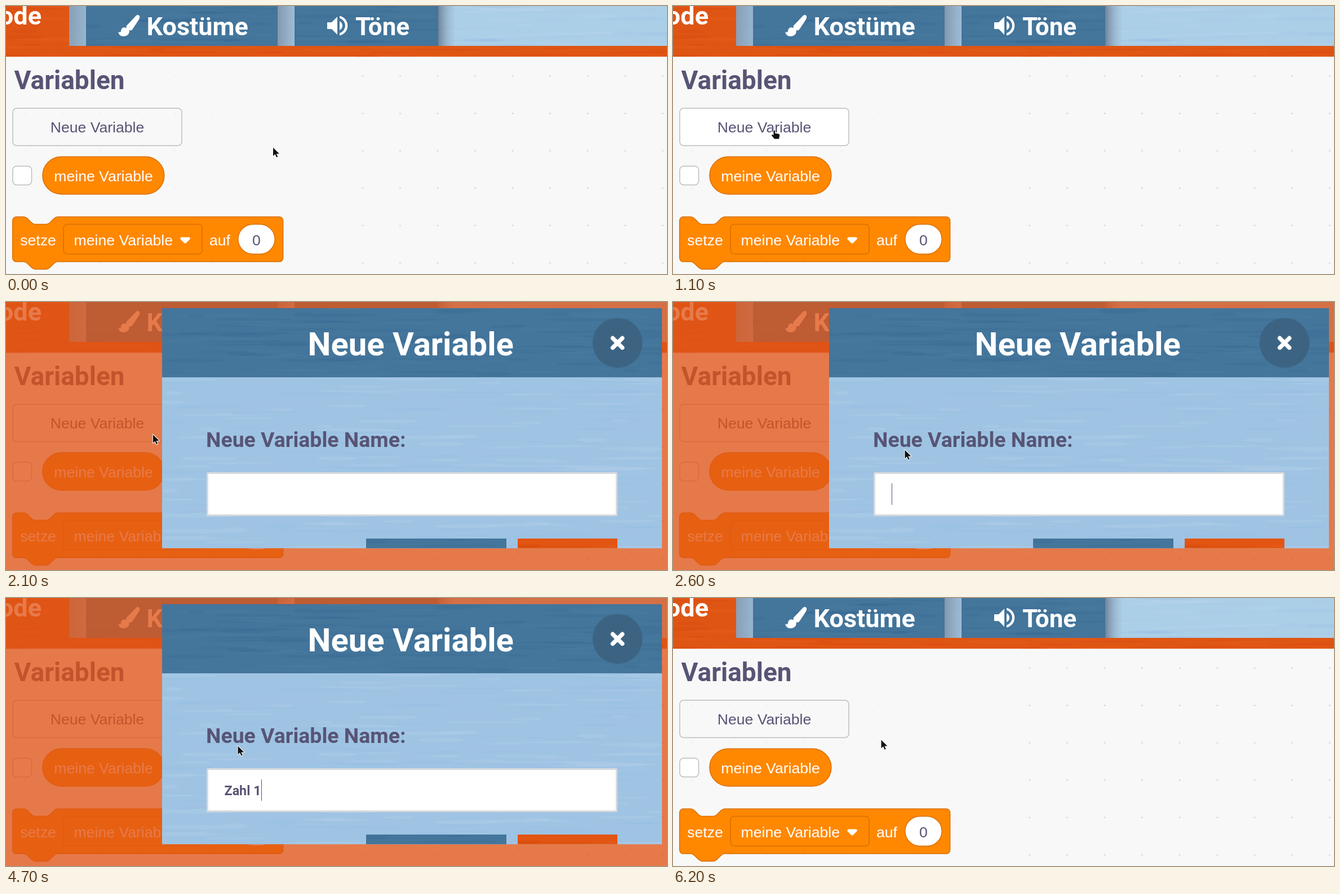
Write an HTML page with a canvas that moves like this. It is 1173 px wide and 477 px high and loops after 7400 ms.

```html
<!DOCTYPE html>
<html lang="de">
<head>
<meta charset="utf-8">
<title>Neue Variable</title>
<style>
html, body { margin: 0; width: 100%; height: 100%; overflow: hidden; background: #f8f8f8; }
canvas { display: block; }
</style>
</head>
<body>
<canvas id="stage" width="1173" height="477"></canvas>
<script>
const W = 1173, H = 477, LOOP = 7400;
const INK = '#575475', BLUE = '#44759b', ORANGE = '#df5514', BLOCK = '#ff8800', EDGE = '#db6e00';
const stage = document.getElementById('stage').getContext('2d');
const head = size => `bold ${size}px Roboto, "Open Sans", sans-serif`;
const LABEL = '26.6px "Liberation Sans", Arial, sans-serif';

function layer(draw) {
  const canvas = document.createElement('canvas');
  canvas.width = W;
  canvas.height = H;
  draw(canvas.getContext('2d'));
  return canvas;
}

function text(c, str, x, y, font, color, align = 'left') {
  c.font = font;
  c.fillStyle = color;
  c.textAlign = align;
  c.fillText(str, x, y);
}

function box(c, x, y, w, h, r, fill, stroke, line = 1.5) {
  c.beginPath();
  c.roundRect(x, y, w, h, r);
  paint(c, fill, stroke, line);
}

function paint(c, fill, stroke, line, path) {
  const args = path ? [path] : [];
  if (fill) { c.fillStyle = fill; c.fill(...args); }
  if (stroke) { c.strokeStyle = stroke; c.lineWidth = line; c.stroke(...args); }
}

function shape(c, d, x, y, scale, fill, stroke, line) {
  c.save();
  c.translate(x, y);
  c.scale(scale, scale);
  paint(c, fill, stroke, line, new Path2D(d));
  c.restore();
}

// Flat area with soft horizontal brush streaks
function brushed(c, x, y, w, h, color, tints, seed) {
  const rnd = () => (seed = seed * 16807 % 2147483647) / 2147483647;
  c.save();
  c.beginPath();
  c.rect(x, y, w, h);
  c.clip();
  c.fillStyle = color;
  c.fillRect(x, y, w, h);
  for (let i = w * h / 900; i > 0; i--) {
    const len = 30 + 150 * rnd();
    c.fillStyle = tints[i % tints.length | 0];
    c.beginPath();
    c.ellipse(x + w * rnd(), y + h * rnd(), len / 2, 1 + 2.5 * rnd(), 0.02 * (rnd() - 0.5), 0, 7);
    c.fill();
  }
  c.restore();
}

const blueTints = ['rgba(35,85,130,.12)', 'rgba(90,140,170,.09)'];
const skyTints = ['rgba(185,215,238,.22)', 'rgba(135,178,220,.16)', 'rgba(165,190,228,.18)'];
const orangeTints = ['rgba(205,65,5,.16)', 'rgba(240,105,35,.16)'];

function shadow(c, x, w, from, to) {
  const g = c.createLinearGradient(x, 0, x + w, 0);
  g.addColorStop(0, from);
  g.addColorStop(1, to);
  c.fillStyle = g;
  c.fillRect(x, 0, w, 71);
}

const BRUSH = 'M36 0Q40 2 37 8L25 26Q22 29 18 26Q13 23 15 19L31 2Q34-1 36 0ZM11 22Q20 24 20 30Q18 38 9 38Q2 38 0 30Q5 32 5 28Q6 22 11 22Z';
const SPEAKER = 'M0 6H4L9 1V17L4 12H0ZM11 5Q13.5 6.3 13.5 9T11 13ZM11 .2A9 9 0 0 1 11 17.8V15.7A7 7 0 0 0 11 2.3Z';
const NOTCH = 'M0 4A4 4 0 0 1 4 0H12c2 0 3 1 4 2l4 4c1 1 2 2 4 2h12c2 0 3-1 4-2l4-4c1-1 2-2 4-2H284.7a4 4 0 0 1 4 4v40a4 4 0 0 1-4 4H48c-2 0-3 1-4 2l-4 4c-1 1-2 2-4 2h-12c-2 0-3-1-4-2l-4-4c-1-1-2-2-4-2H4a4 4 0 0 1-4-4Z';
const ARROW = 'M0 0V15L3.5 11.8L6 17.3L8.3 16.3L5.8 11H11Z';
const HAND = 'M3.5 1Q5-.5 6 1V5.5L12 6.5Q14.5 7 14.2 9.5L13 15.5H5L0 9.5Q0 7.5 2 8L3.5 9Z';

function drawTabs(c) {
  brushed(c, 0, 0, W, 71, '#accfe8', skyTints, 11);
  shadow(c, 112, 30, 'rgba(125,145,168,.75)', 'rgba(145,172,198,.75)');
  shadow(c, 482, 30, 'rgba(125,142,162,.85)', 'rgba(150,178,204,.65)');
  shadow(c, 767, 29, 'rgba(105,125,147,.9)', 'rgba(160,190,215,.25)');
  brushed(c, 142, 0, 340, 71, BLUE, blueTints, 21);
  brushed(c, 512, 0, 255, 71, BLUE, blueTints, 31);
  brushed(c, 0, 0, 112, 72, ORANGE, orangeTints, 41);
  brushed(c, 0, 71, W, 19.5, ORANGE, orangeTints, 51);
  text(c, 'Code', 63, 33, head(45), '#fff', 'right');
  shape(c, BRUSH, 199, 16, 1, '#fff');
  text(c, 'Kostüme', 249.5, 52, head(45), '#fff');
  shape(c, SPEAKER, 570, 17, 2, '#fff');
  text(c, 'Töne', 620, 52, head(44), '#fff');
}

function drawPalette(c) {
  for (let x = 34; x < W; x += 66.55)
    for (let y = 125; y < H; y += 66.45) {
      c.fillStyle = x > 600 ? '#dcdcdc' : '#f1f1f1';
      c.beginPath();
      c.arc(x, y, 1.6, 0, 7);
      c.fill();
    }
  text(c, 'Variablen', 14.5, 148, head(46), INK);
  box(c, 12, 285, 33.5, 33.5, 7, '#fff', '#bdbdbd');
  box(c, 65, 268.3, 215.8, 66.7, 33.3, BLOCK, EDGE);
  text(c, 'meine Variable', 173, 312, LABEL, '#fff', 'center');

  shape(c, NOTCH, 11.7, 375.3, 1.6625, BLOCK, EDGE, 0.9);
  text(c, 'setze', 57, 425.5, LABEL, '#fff', 'center');
  box(c, 102, 388.5, 246, 53, 6.6, BLOCK, EDGE);
  text(c, 'meine Variable', 208.3, 425.5, LABEL, '#fff', 'center');
  shape(c, 'M2 0H16Q19 1 17 4L11 10Q9 12 7 10L1 4Q-1 1 2 0Z', 309, 411.5, 1, '#fff');
  text(c, 'auf', 379.5, 425.5, LABEL, '#fff', 'center');
  box(c, 411.8, 388.5, 65.4, 53, 26.5, '#fff', EDGE);
  text(c, '0', 444.5, 425.5, LABEL, INK, 'center');
}

function drawButton(c, hover) {
  box(c, 12, 182, 300, 66.5, 7, hover && '#fff', '#bdbdbd');
  text(c, 'Neue Variable', 162, 224.5, LABEL, INK, 'center');
}

function drawDialog(c) {
  c.fillStyle = 'rgba(224,85,24,.78)';
  c.fillRect(0, 0, W, H);
  brushed(c, 277, 134, 887, 304.5, '#9fc4e3', skyTints, 61);
  brushed(c, 277, 11, 887, 123, BLUE, blueTints, 71);
  text(c, 'Neue Variable', 535.5, 95, head(58), '#fff');
  c.beginPath();
  c.arc(1085.2, 72.8, 44.3, 0, 7);
  paint(c, '#3c6482');
  c.lineCap = 'round';
  shape(c, 'M-8.5-8.5L8.5 8.5M-8.5 8.5L8.5-8.5', 1085.2, 72.8, 1, null, '#fff', 7.5);
  text(c, 'Neue Variable Name:', 355, 258, head(37.4), INK);
  box(c, 357.5, 304.5, 726, 75, 1, '#fff', '#d7dade', 3);
  brushed(c, 639, 421, 249, 17.5, BLUE, blueTints, 81);
  brushed(c, 908, 421, 177, 17.5, '#e35512', orangeTints, 91);
}

const base = layer(c => {
  c.fillStyle = '#f8f8f8';
  c.fillRect(0, 0, W, H);
  drawTabs(c);
  drawPalette(c);
});
const dialog = layer(drawDialog);

// Pointer moves in 100 ms steps: start, step count, end position
const moves = [[600, 6, 179, 221], [2000, 5, 411.5, 263.5], [5900, 4, 369.5, 252.5]];
const typed = [[3100, 'Z'], [3400, 'Za'], [3900, 'Zahl'], [4400, 'Zahl '], [4700, 'Zahl 1']];

function pointer(t) {
  let x = 474, y = 252;
  for (const [start, steps, toX, toY] of moves) {
    if (t < start) break;
    const k = Math.min(1, (Math.floor((t - start) / 100) + 1) / steps);
    const ease = k * k * (3 - 2 * k);
    x += (toX - x) * ease;
    y += (toY - y) * ease;
  }
  return { x, y };
}

function drawInput(c, t) {
  const word = typed.reduce((last, [at, str]) => t >= at ? str : last, '');
  text(c, word, 387.5, 351, head(23.3), INK);
  if (t >= 2100 && t < 2600) return;
  c.fillStyle = INK;
  c.fillRect(Math.round(388 + c.measureText(word).width), 323, 1, 38);
}

function frame(now) {
  const t = now % LOOP, c = stage;
  const open = t >= 1400 && t < 5200;
  const { x, y } = pointer(t);
  const hover = !open && x < 312 && y > 182 && y < 248;
  c.drawImage(base, 0, 0);
  drawButton(c, hover);
  if (open) {
    c.drawImage(dialog, 0, 0);
    drawInput(c, t);
  }
  c.lineJoin = 'round';
  const [d, px, py] = hover ? [HAND, x - 4, y] : [ARROW, x, y];
  shape(c, d, px, py, 1, null, '#fff', 2);
  shape(c, d, px, py, 1, '#111');
  requestAnimationFrame(frame);
}
requestAnimationFrame(frame);
</script>
</body>
</html>
```
